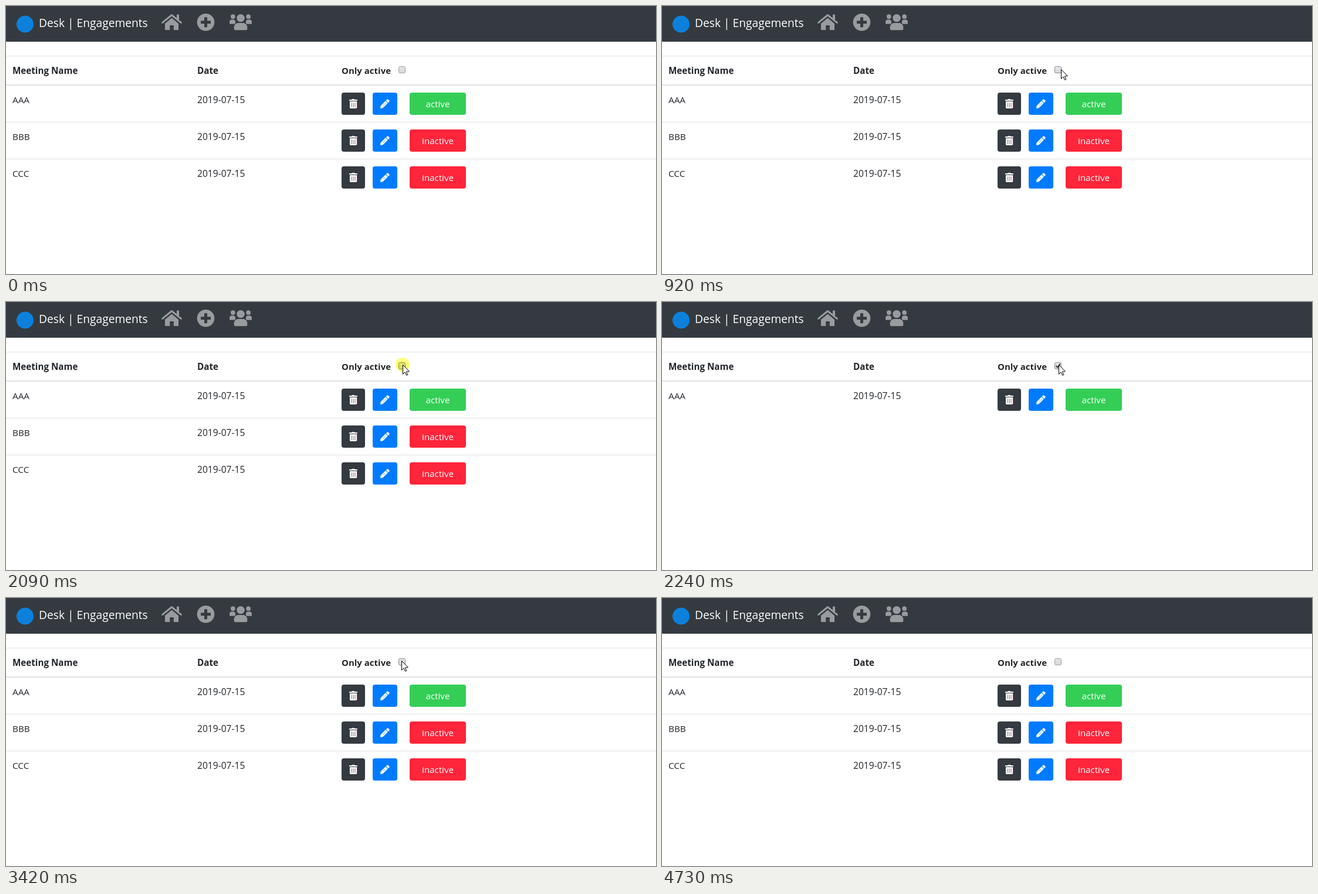
An HTML page with a canvas for the animation above (5.97 s loop, 1108 by 458 pixels).

```html
<!DOCTYPE html>
<html lang="en">
<head>
<meta charset="utf-8">
<title>Meetings</title>
<style>
  html, body { margin: 0; width: 100%; height: 100%; overflow: hidden; background: #fff; }
  canvas { display: block; width: 1108px; height: 458px; }
</style>
</head>
<body>
<canvas id="stage" width="1108" height="458"></canvas>
<script>
const ctx = document.getElementById('stage').getContext('2d');
const LOOP = 5970;
const FONT = '"Open Sans", "Noto Sans", sans-serif';
const DARK = '#343a40', ICON = '#999b9e', LINE = '#dee2e6', INK = '#212529';
const ROWS = ['AAA', 'BBB', 'CCC'];

const easeOut = p => 1 - (1 - p) ** 1.7;
const smooth = p => p * p * (3 - 2 * p);

// Pointer moves: start and end time, number of discrete positions, path, easing.
const MOVES = [
  { start: 320, end: 860, steps: 8, from: [1029, 424], to: [697, 108], ease: easeOut },
  { start: 920, end: 1000, steps: 2, from: [680, 108], to: [674, 107], ease: p => p },
  { start: 1310, end: 1550, steps: 4, from: [671, 107], to: [676, 107], ease: smooth },
  { start: 2410, end: 2650, steps: 4, from: [688, 105], to: [775, 102], ease: smooth },
  { start: 2800, end: 3020, steps: 4, from: [764, 101], to: [678, 104], ease: easeOut },
  { start: 3100, end: 3170, steps: 2, from: [676, 106], to: [674, 107], ease: p => p },
  { start: 3950, end: 4500, steps: 8, from: [684, 113], to: [1072, 414], ease: smooth },
  { start: 4580, end: 4660, steps: 2, from: [1066, 430], to: [1058, 446], ease: p => p }
];

function pointerAt(t) {
  if (t >= 4730) return null;
  const move = MOVES.filter(m => t >= m.start).pop();
  if (!move) return null;
  const { start, end, steps, from, to, ease } = move;
  const gap = (end - start) / (steps - 1);
  const index = Math.min(steps - 1, Math.floor((t - start + 5) / gap));
  const p = ease(index / (steps - 1));
  return from.map((v, i) => Math.round(v + (to[i] - v) * p));
}

function rect(x, y, w, h, color, radius = 0) {
  ctx.fillStyle = color;
  ctx.beginPath();
  ctx.roundRect(x, y, w, h, radius);
  ctx.fill();
}

function circle(x, y, r, color) {
  ctx.fillStyle = color;
  ctx.beginPath();
  ctx.arc(x, y, r, 0, Math.PI * 2);
  ctx.fill();
}

function polyline(points, closed) {
  ctx.beginPath();
  points.forEach(([x, y]) => ctx.lineTo(x, y));
  if (closed) ctx.closePath();
}

function label(text, x, y, size, color = INK, weight = 400, align = 'left') {
  ctx.font = `${weight} ${size}px ${FONT}`;
  ctx.fillStyle = color;
  ctx.textAlign = align;
  ctx.fillText(text, x, y);
}

function at(x, y, draw) {
  ctx.save();
  ctx.translate(x, y);
  draw();
  ctx.restore();
}

function homeIcon() {
  ctx.fillStyle = ctx.strokeStyle = ICON;
  ctx.lineWidth = 3;
  ctx.lineCap = ctx.lineJoin = 'round';
  polyline([[1.6, 15.8], [17.5, 3], [33.4, 15.8]]);
  ctx.stroke();
  rect(26, 2, 4, 10, ICON, 0.6);
  polyline([[17.5, 8], [29, 17.5], [29, 28.5], [20.8, 28.5], [20.8, 20.5],
    [14.2, 20.5], [14.2, 28.5], [6, 28.5], [6, 17.5]], true);
  ctx.fill();
}

function plusIcon() {
  circle(0, 0, 14.8, ICON);
  rect(-8.5, -2.5, 17, 5, DARK, 0.7);
  rect(-2.5, -8.5, 5, 17, DARK, 0.7);
}

function usersIcon() {
  for (const side of [-1, 1]) {
    circle(side * 13.2, 4.3, 3.9, ICON);
    rect(side * 14 - 5, 9.5, 10, 7.5, ICON, [4, 4, 1, 1]);
  }
  rect(-12.4, 14, 24.8, 14, DARK, [8, 8, 0, 0]);
  circle(0, 6.8, 8, DARK);
  circle(0, 6.8, 6.7, ICON);
  rect(-11.3, 15.2, 22.6, 12.2, ICON, [7, 7, 2.5, 2.5]);
}

function trashIcon() {
  rect(4.5, 0, 5, 2, '#fff', 1);
  rect(0, 1, 14, 2, '#fff', 0.5);
  rect(1, 4, 12, 12, '#fff', [0, 0, 1.5, 1.5]);
  for (const x of [3.5, 6.5, 9.5]) rect(x, 6.3, 1, 7.6, '#70757a');
  rect(13, 4, 1, 11, '#c8323c');
}

function pencilIcon() {
  ctx.fillStyle = ctx.strokeStyle = '#fff';
  ctx.lineWidth = 0.7;
  ctx.lineJoin = 'round';
  const body = [[0.4, 15.6], [0.9, 11.7], [9, 3.6], [12.4, 7], [4.3, 15.1]];
  const eraser = [[10.1, 2.5], [11.9, 0.7], [13.2, 0.7], [15.3, 2.8], [15.3, 4.1], [13.5, 5.9]];
  for (const shape of [body, eraser]) {
    polyline(shape, true);
    ctx.fill();
    ctx.stroke();
  }
  ctx.strokeStyle = '#007bff';
  polyline([[5, 11], [9.4, 6.6]]);
  ctx.stroke();
}

function navbar() {
  rect(0, 0, 1108, 61, DARK);
  circle(32.5, 31, 14.5, '#0d80dc');
  label('Desk | Engagements', 56, 36, 19.2, '#fff');
  at(265, 12.5, homeIcon);
  at(340.5, 27.7, plusIcon);
  at(400, 13.8, usersIcon);
}

function checkbox(checked, hovered) {
  const shade = ctx.createLinearGradient(0, 103, 0, 115);
  shade.addColorStop(0, hovered ? '#e6e8ea' : '#e4e4e4');
  shade.addColorStop(1, hovered ? '#d4d8dc' : '#d8d8d8');
  rect(669.5, 103.5, 11, 11, shade, 2);
  ctx.strokeStyle = hovered ? '#8c8c8c' : '#a3a3a3';
  ctx.lineWidth = 1;
  ctx.stroke();
  if (!checked) return;
  ctx.strokeStyle = '#3c3c3c';
  ctx.lineWidth = 2;
  ctx.lineCap = 'butt';
  ctx.lineJoin = 'miter';
  polyline([[671.6, 109], [674.2, 111.7], [678.8, 105.6]]);
  ctx.stroke();
}

function header(checked, hovered) {
  rect(0, 85, 1108, 1, LINE);
  rect(0, 134, 1108, 2, LINE);
  label('Meeting Name', 11, 116, 15.2, INK, 700);
  label('Date', 326, 116, 15.2, INK, 700);
  label('Only active', 572, 116, 15, INK, 700);
  checkbox(checked, hovered);
}

function row(name, index) {
  const y = 136 + index * 63, active = index === 0;
  if (index) rect(0, y - 1, 1108, 1, LINE);
  label(name, 11, y + 30, 15.3);
  label('2019-07-15', 326, y + 30, 15.6);
  rect(572, y + 12, 40, 38, DARK, 4);
  at(585, y + 23, trashIcon);
  rect(625, y + 12, 42, 38, '#007bff', 4);
  at(638, y + 23, pencilIcon);
  rect(688, y + 12, 96, 38, active ? '#34ce57' : '#ff253a', 4);
  label(active ? 'active' : 'inactive', 736, y + 37, 15.1, '#fff', 400, 'center');
}

function clickGlow([x, y]) {
  ctx.globalCompositeOperation = 'multiply';
  circle(x, y, 12, '#ffff78');
  ctx.globalCompositeOperation = 'source-over';
}

function arrow() {
  polyline([[0.5, 0.5], [0.5, 16.3], [4.1, 12.9], [6.6, 18.4], [8.8, 17.4],
    [6.4, 12], [11.3, 11.5]], true);
  ctx.fillStyle = '#fff';
  ctx.strokeStyle = '#000';
  ctx.lineWidth = 1;
  ctx.lineJoin = 'miter';
  ctx.fill();
  ctx.stroke();
}

function draw(t) {
  const checked = t >= 2240 && t < 3420;
  const clicking = (t >= 2090 && t < 2240) || (t >= 3340 && t < 3420);
  const pointer = pointerAt(t);
  const hovered = !!pointer && pointer[0] <= 681 && pointer[1] <= 115;
  rect(0, 0, 1108, 458, '#fff');
  navbar();
  header(checked, hovered);
  ROWS.slice(0, checked ? 1 : 3).forEach(row);
  if (clicking) clickGlow(pointer);
  if (pointer) at(...pointer, arrow);
}

const began = performance.now();
function tick() {
  draw((performance.now() - began) % LOOP);
  requestAnimationFrame(tick);
}
tick();
</script>
</body>
</html>
```
